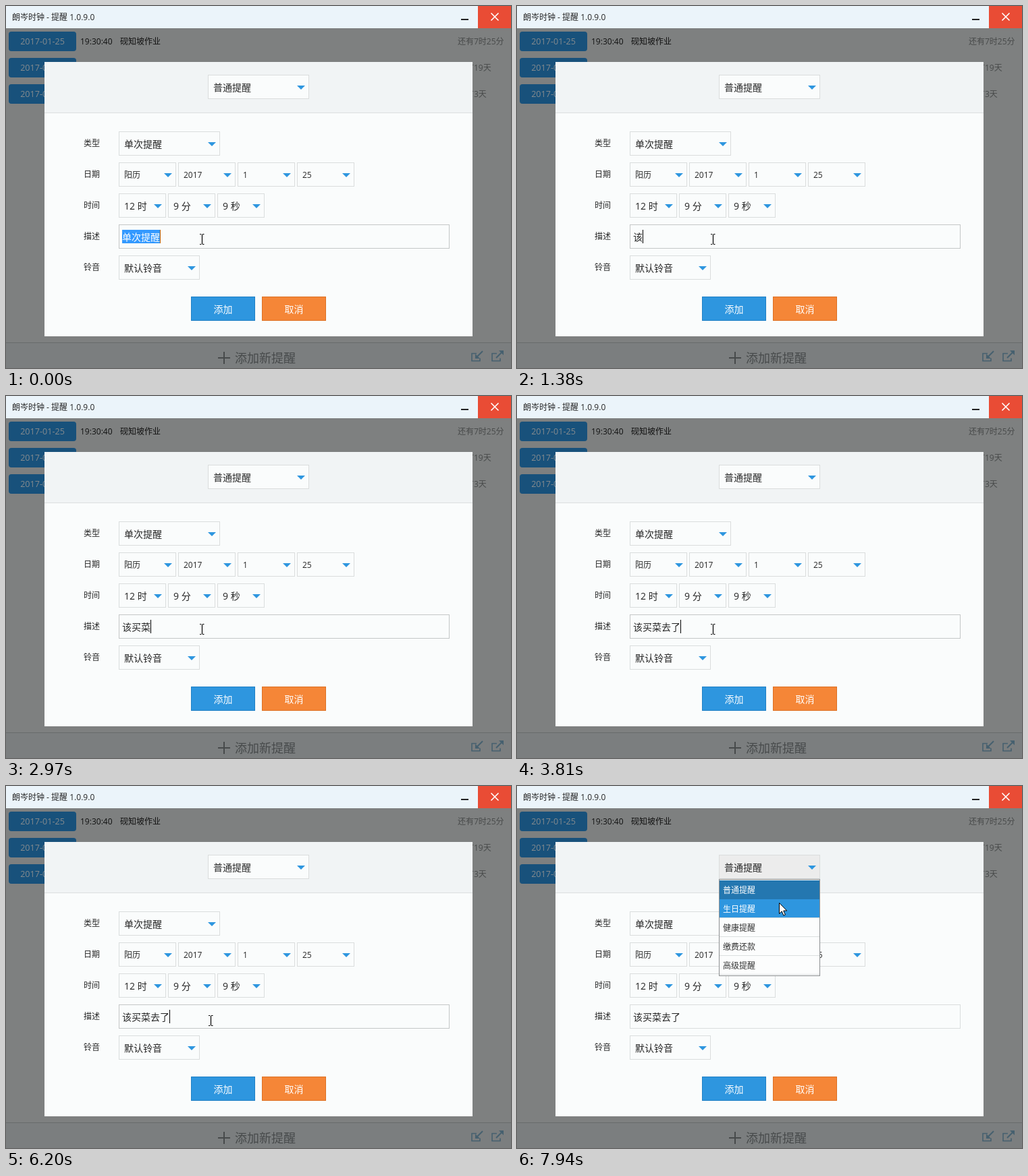
Recreate the animation shown at these times as an HTML page. Size 748 px wide and 537 px high, loop 8 s.

```html
<!DOCTYPE html>
<html lang="zh-CN">
<head>
<meta charset="utf-8">
<title>提醒</title>
<style>
  html, body { margin: 0; width: 100%; height: 100%; overflow: hidden; background: #7e8080; }
  svg { display: block; width: 748px; height: 537px; }
  text { font-family: "Open Sans", "Noto Sans CJK SC", "Noto Sans CJK", sans-serif; white-space: pre; }
</style>
</head>
<body>
<svg id="stage" viewBox="0 0 748 537"></svg>
<script>
const stage = document.getElementById('stage');
const LOOP = 8000;
const BLUE = '#2e96df', INK = '#262626', PANEL = '#fafcfc', EDGE = '#dadddd';

function add(tag, attrs, parent = stage) {
  const node = document.createElementNS('http://www.w3.org/2000/svg', tag);
  for (const key in attrs) node.setAttribute(key, attrs[key]);
  parent.appendChild(node);
  return node;
}
const group = () => add('g', {});
const rect = (x, y, width, height, fill, parent, extra) =>
  add('rect', { x, y, width, height, fill, ...extra }, parent);
const framed = (x, y, w, h, fill, stroke, parent) =>
  rect(x + .5, y + .5, w - 1, h - 1, fill, parent, { stroke });
const path = (d, stroke, width, parent, fill = 'none') =>
  add('path', { d, stroke, 'stroke-width': width, fill }, parent);

// Places text by its vertical middle.
function label(str, x, middle, size = 12, fill = INK, parent, anchor = 'start') {
  const node = add('text', { x, y: middle + size * .38, 'font-size': size, fill, 'text-anchor': anchor }, parent);
  node.textContent = str;
  return node;
}

function combo(str, x, y, w, size = 14) {
  const box = framed(x, y, w, 36, PANEL, EDGE);
  label(str, x + 8, y + (size > 12 ? 19 : 18), size);
  const cx = x + w - 12;
  path(`M${cx - 6} ${y + 16}h12l-6 6z`, 'none', 0, stage, BLUE);
  return box;
}

function button(str, x, fill, edge) {
  framed(x, 431, 95, 36, fill, edge);
  label(str, x + 47.5, 450, 14, '#fff', stage, 'middle');
}

function drawWindow() {
  rect(0, 0, 748, 537, '#7e8080');
  rect(0, 0, 748, 33, '#ebf4fa');
  label('朗岑时钟 - 提醒 1.0.9.0', 9, 16);
  rect(674, 19, 11, 2, '#222');
  rect(699, 0, 49, 33, '#e94c35');
  path('M718.5 10.5l11 11m0-11l-11 11', '#fff', 1.6);

  ['还有7时25分', '还有19天', '还有3天'].forEach((left, i) => {
    const y = 38 + i * 39;
    rect(4, y, 100, 29, '#18517b', stage, { rx: 4 });
    label('2017-01-25', 54, y + 14.5, 12.6, '#848a8e', stage, 'middle');
    label(left, 669, y + 14.5, 12, '#484a4a');
  });
  label('19:30:40', 110, 52.5, 12, '#111');
  label('砚知坡作业', 169, 52.5, 12, '#111');

  rect(0, 499, 748, 38, '#7b7e7f');
  rect(0, 499, 748, 1, '#686b6b');
  path('M314 522h18M323 513v18', '#474a4b', 2);
  label('添加新提醒', 339, 522, 18, '#474a4b');
  [690, 720].forEach((x, i) => {
    path(`M${x + 7} 515.5h-7v11h12v-4`, '#46606f', 1.6);
    path(i ? `M${x + 6} 522l9-9` : `M${x + 16} 512l-9 9`, '#46606f', 2);
    path(i ? `M${x + 17} 511v7l-7-7z` : `M${x + 5} 523v-7l7 7z`, 'none', 0, stage, '#46606f');
  });
}

function drawDialog() {
  rect(57, 83, 634, 407, PANEL);
  rect(57, 83, 634, 75, '#f1f4f5');
  rect(57, 158, 634, 1, '#dcdfe0');
  const kind = combo('普通提醒', 299, 102, 150);
  ['类型', '日期', '时间', '描述', '铃音'].forEach((s, i) => label(s, 115, 203.5 + i * 46));
  combo('单次提醒', 167, 186, 150);
  ['阳历', '2017', '1', '25'].forEach((s, i) => combo(s, 167 + i * 88, 232, 85, 12));
  ['12 时', '9 分', '9 秒'].forEach((s, i) => combo(s, 167 + i * 73, 278, 70));
  const field = framed(167, 324, 490, 36, PANEL, '#c4c7c7');
  combo('默认铃音', 167, 370, 120);
  button('添加', 274, BLUE, '#1f7fc4');
  button('取消', 379, '#f58637', '#dd7023');
  return { kind, field };
}

function drawMenu() {
  const menu = group();
  framed(299, 138, 150, 144, '#fcfdfd', '#8c8f90', menu);
  const rows = ['普通提醒', '生日提醒', '健康提醒', '缴费还款', '高级提醒'].map((s, i) => {
    const y = 140 + i * 28;
    const back = rect(300, y, 148, 28, i ? 'none' : '#2477b0', menu);
    if (i) rect(300, y + 27, 148, 1, '#dcdfe0', menu);
    return { back, text: label(s, 305, y + 14, 12, i ? '#333' : '#fff', menu) };
  });
  return { menu, birthday: rows[1] };
}

drawWindow();
const { kind, field } = drawDialog();
const selection = rect(172, 332, 57, 20, '#3399ff');
const typed = label('', 172, 343, 14);
const caret = rect(0, 332, 1, 20, '#000');

const ime = group();
const imeBox = framed(0, 354, 300, 56, '#fff', '#c5cdd3', ime);
const imeRule = rect(0, 380, 1, 1, '#e3e7ea', ime);
const imeKeys = label('', 0, 368, 14, '#222', ime);
const imeFirst = label('', 0, 396, 15, '#d8432e', ime);
const imeRest = label('', 0, 396, 15, '#333', ime);

const { menu, birthday } = drawMenu();
const ring = add('circle', { cx: 429.5, cy: 125.5, r: 10, fill: 'none', stroke: '#111', 'stroke-width': 1.2 });
const beam = path('M-3 -7.5h2.5M1 -7.5h2.5M-3 7.5h2.5M1 7.5h2.5M.5 -7v14', '#000', 1.2);
const arrow = path('M.5 .5v16l3.7-3.6 2.7 6.2 2.5-1.1-2.7-6h5z', '#000', 1, stage, '#fff');

// Start time, text, caret position.
const ENTRIES = [[0, '单次提醒', 228], [1320, '该', 186], [2970, '该买菜', 214], [3810, '该买菜去了', 242]];
// Times at which the caret goes off, on, off ...
const BLINKS = [370, 880, 1940, 2440, 3500, 3810, 4300, 4860, 5360, 5900, 6430, 6910, 7280];
// Start time, keys, candidates, left and right edge.
const COMPOSING = [
  [0], [370, 'g', '个 给 该 过 跟', 230, 527], [640, 'ga', '嘎 尬 噶 旮 尕', 230, 543],
  [880, 'gai', '该 改 盖 概 钙', 230, 543], [1320],
  [2120, 'm', '吗 没 么 们 买', 188, 485], [2230, 'ma', '吗 妈 马 嘛 骂', 188, 501],
  [2340, 'mai', '买 卖 迈 麦 埋', 188, 501], [2440, "mai'c", '买车 卖车 买成 买错 买菜', 188, 593],
  [2550, "mai'ca", '买菜 卖菜 买 卖 迈', 188, 533], [2660, "mai'cai", '买菜 卖菜 买 卖 迈', 188, 533], [2970],
  [3150, 'q', '去 请 前 却 其', 216, 513], [3200, 'qu', '去 取 区 曲 趣', 216, 529],
  [3260, "qu'l", '去了 取了 去 取 区', 216, 557], [3440, "qu'le", '去了 取了 娶了 区了 去', 216, 593], [3810]
];
const POINTER = [
  [0, 290, 346], [5360, 292, 347], [5480, 295, 348], [5590, 297, 349], [6200, 303, 348]
];

// Adds evenly timed pointer stops along a quadratic curve.
function sweep(from, to, count, [x0, y0], [x1, y1], [x2, y2]) {
  for (let i = 1; i <= count; i++) {
    const u = i / count, v = 1 - u;
    const at = (a, b, c) => Math.round(v * v * a + 2 * u * v * b + u * u * c);
    POINTER.push([from + (to - from) * (i - 1) / (count - 1), at(x0, x1, x2), at(y0, y1, y2)]);
  }
}
sweep(6260, 6670, 8, [303, 348], [620, 190], [428, 124]);
sweep(7710, 7940, 5, [428, 124], [418, 152], [388, 173]);

const latest = (list, t) => list.filter(item => item[0] <= t + .5).pop();
const show = (node, on) => node.setAttribute('visibility', on ? 'visible' : 'hidden');
const set = (node, attrs) => { for (const key in attrs) node.setAttribute(key, attrs[key]); };

function updateIme(t) {
  const [, keys, words, left, right] = latest(COMPOSING, t);
  show(ime, keys);
  if (!keys) return;
  const [first, ...rest] = words.split(' ').map((word, i) => `${i + 1}.${word}`);
  set(imeBox, { x: left + .5, width: right - left - 1 });
  set(imeRule, { x: left + 1, width: right - left - 2 });
  imeKeys.textContent = keys;
  imeFirst.textContent = first;
  imeRest.textContent = rest.join('  ');
  imeKeys.setAttribute('x', left + 10);
  imeFirst.setAttribute('x', left + 10);
  imeRest.setAttribute('x', left + 22 + 15 * (first.length - 1));
}

function update(t) {
  const [start, text, caretX] = latest(ENTRIES, t);
  const selected = start === 0;
  typed.textContent = text;
  set(typed, { fill: selected ? '#fff' : INK });
  show(selection, selected);
  set(caret, { x: caretX, fill: selected ? '#cc6600' : '#000' });
  show(caret, BLINKS.filter(b => b <= t).length % 2 === 0);
  updateIme(t);

  const open = t >= 7280;
  show(menu, open);
  set(kind, { fill: open ? '#ececec' : PANEL });
  set(field, { stroke: open ? EDGE : '#c4c7c7' });
  show(ring, t >= 7220 && t < 7340);

  const [, x, y] = latest(POINTER, t);
  const overField = y > 324;
  show(beam, overField);
  show(arrow, !overField);
  set(overField ? beam : arrow, { transform: `translate(${x} ${y})` });

  const hovered = open && y >= 168;
  set(birthday.back, { fill: hovered ? BLUE : 'none' });
  set(birthday.text, { fill: hovered ? '#fff' : '#333' });
}

const began = performance.now();
function tick() {
  update((performance.now() - began) % LOOP);
  requestAnimationFrame(tick);
}
tick();
</script>
</body>
</html>
```
